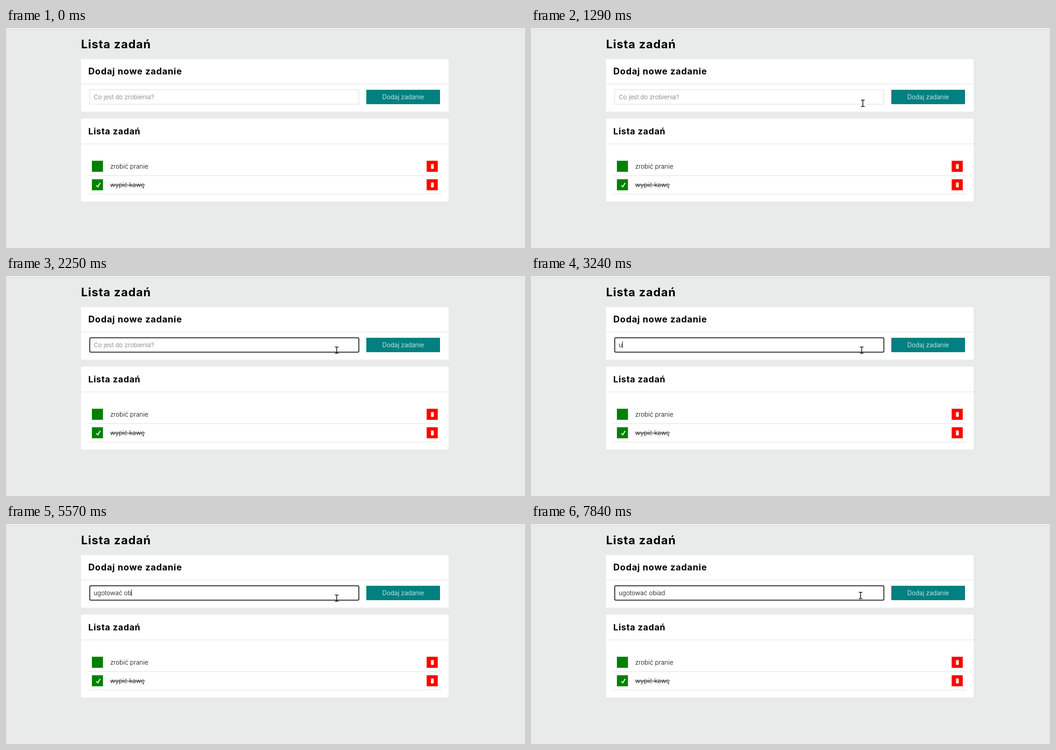
Recreate the animation shown at these times as an HTML page. Size 1148x488 px, loop 8000 ms.

```html
<!DOCTYPE html>
<html lang="pl">
<head>
<meta charset="utf-8">
<title>Lista zadań</title>
<style>
  html, body { margin: 0; width: 100%; height: 100%; overflow: hidden; background: #e9ebea; }
  svg { display: block; width: 1148px; height: 488px; }
  text { font-family: Inter, "Open Sans", sans-serif; font-weight: 300; font-optical-sizing: none; white-space: pre; }
  .title { font-weight: 700; letter-spacing: .041em; }
  .panel { fill: #fff; }
  .rule { stroke: #dcdcdc; }
  .done { fill: green; }
  .delete { fill: red; }
</style>
</head>
<body>
<svg viewBox="0 0 1148 488">
  <defs>
    <g id="bin">
      <path d="M-3.6-4.6H-1.5L-1-5.6H1.2L1.7-4.6H3.8V-3.1H-3.6ZM-3.1-2.5H3.3V4.4Q3.3 5.5 2.2 5.5H-2Q-3.1 5.5-3.1 4.4Z"/>
      <path d="M-1.2-1V4M1.4-1V4" stroke="red" stroke-opacity=".2" stroke-width=".7"/>
    </g>
  </defs>

  <rect width="1148" height="488" fill="#e9ebea"/>
  <rect width="1148" height="2" fill="#fff"/>
  <rect y="1.5" width="1148" height="1.2" fill="#d2d4d4"/>

  <text class="title" x="166" y="45" font-size="25.7">Lista zadań</text>

  <rect class="panel" x="166" y="69" width="813" height="116.5"/>
  <text class="title" x="182" y="103" font-size="19.7">Dodaj nowe zadanie</text>
  <path class="rule" d="M166 124H979"/>
  <rect id="field" fill="#fff"/>
  <text id="hint" x="194" y="157.5" font-size="13.7" fill="#707070" style="font-weight:350">Co jest do zrobienia?</text>
  <text id="entry" x="194" y="157.5" font-size="13.8"></text>
  <rect id="caret" y="145" width="1" height="15"/>
  <rect x="797" y="137" width="163" height="32" fill="teal"/>
  <text x="878.5" y="157.5" font-size="13.95" fill="#fff" text-anchor="middle">Dodaj zadanie</text>

  <rect class="panel" x="166" y="201" width="813" height="184"/>
  <text class="title" x="182" y="235.5" font-size="19.2">Lista zadań</text>
  <path class="rule" d="M166 257H979M182 327.5H963M182 368.5H963"/>

  <rect class="done" x="190" y="294.5" width="24.5" height="24.5"/>
  <text x="230.5" y="311.5" font-size="13.9">zrobić pranie</text>
  <rect class="delete" x="930.5" y="294.5" width="24.5" height="24.5"/>

  <rect class="done" x="190" y="335.5" width="24.5" height="24.5"/>
  <path d="M199.8 349L202.9 352.6 208.4 343.4" fill="none" stroke="#fff" stroke-width="2"/>
  <text x="230.5" y="352.5" font-size="13.8">wypić kawę</text>
  <path d="M231 348.5H307" stroke="#111"/>
  <rect class="delete" x="930.5" y="335.5" width="24.5" height="24.5"/>

  <g id="bins">
    <use href="#bin" x="943" y="307"/>
    <use href="#bin" x="943" y="348"/>
  </g>

  <path id="arrow" d="M0 0V14L3.2 11 5.3 16 7.3 15.1 5.2 10.3H9.6Z" fill="#fff" stroke="#000" stroke-width=".9"/>
  <path id="beam" d="M-4-7H-1L0-6.5 1-7H4M0-6.5V6.5M-4 7H-1L0 6.5 1 7H4" fill="none" stroke="#000" stroke-width="1.5"/>
  <circle id="halo" cx="731" cy="163.5" r="10.7" fill="#f5ec00"/>
</svg>
<script>
const LOOP = 8000, FOCUS = 1710, BLINK = 530;
const APPROACH = { start: 590, step: 70, steps: 10, from: [1059, 461], to: [734, 167] };
const PHRASE = 'ugotować obiad';
const KEY_TIMES = [3240, 3440, 3640, 3770, 3900, 4300, 4500, 4830, 5100, 5370, 5570, 5770, 5920, 6180];
const BEAM_STOPS = [[1290, 734, 167], [1490, 733, 166], [1710, 732, 164.5], [1990, 731.5, 164.5], [7770, 730.5, 162], [7840, 729, 158.5]];

const el = id => document.getElementById(id);
const [field, hint, entry, caret, bins, arrow, beam, halo] =
  ['field', 'hint', 'entry', 'caret', 'bins', 'arrow', 'beam', 'halo'].map(el);

const show = (node, on) => node.setAttribute('visibility', on ? 'visible' : 'hidden');
const place = (node, x, y) => node.setAttribute('transform', `translate(${x} ${y})`);
const setAll = (node, attrs) => {
  for (const name in attrs) node.setAttribute(name, attrs[name]);
};

const IDLE = { x: 185, y: 137, width: 595.5, height: 32, rx: 0, stroke: '#d8d8d8', 'stroke-width': 1 };
const FOCUSED = { x: 185.3, y: 137.2, width: 595.2, height: 31.6, rx: 2, stroke: '#101010', 'stroke-width': 1.8 };

function drawPointer(t) {
  const { start, step, steps, from, to } = APPROACH;
  const progress = Math.floor((t - start) / step) / steps;
  show(arrow, progress >= 0 && progress < 1);
  show(beam, progress >= 1);
  if (progress < 1) {
    const eased = 1 - (1 - progress) ** 2;
    place(arrow, ...from.map((v, i) => v + (to[i] - v) * eased));
  } else {
    const [, x, y] = BEAM_STOPS.findLast(stop => t >= stop[0]);
    place(beam, x, y);
  }
  show(halo, t >= FOCUS && t < 1990);
  halo.setAttribute('opacity', t < 1920 ? .55 : .3);
}

function drawField(t) {
  const focused = t >= FOCUS;
  const typed = KEY_TIMES.filter(time => t >= time).length;
  setAll(field, focused ? FOCUSED : IDLE);
  show(hint, !typed);
  entry.textContent = PHRASE.slice(0, typed);

  const blinkStart = typed ? KEY_TIMES[typed - 1] : FOCUS + 10;
  show(caret, focused && Math.floor(Math.max(0, t - blinkStart) / BLINK) % 2 === 0);
  caret.setAttribute('x', Math.round(194 + (typed ? entry.getComputedTextLength() : 0)));
  bins.setAttribute('fill', focused ? '#fff' : '#fffbe2');
}

const origin = performance.now();
function frame() {
  const t = (performance.now() - origin) % LOOP;
  drawPointer(t);
  drawField(t);
  requestAnimationFrame(frame);
}
frame();
</script>
</body>
</html>
```
